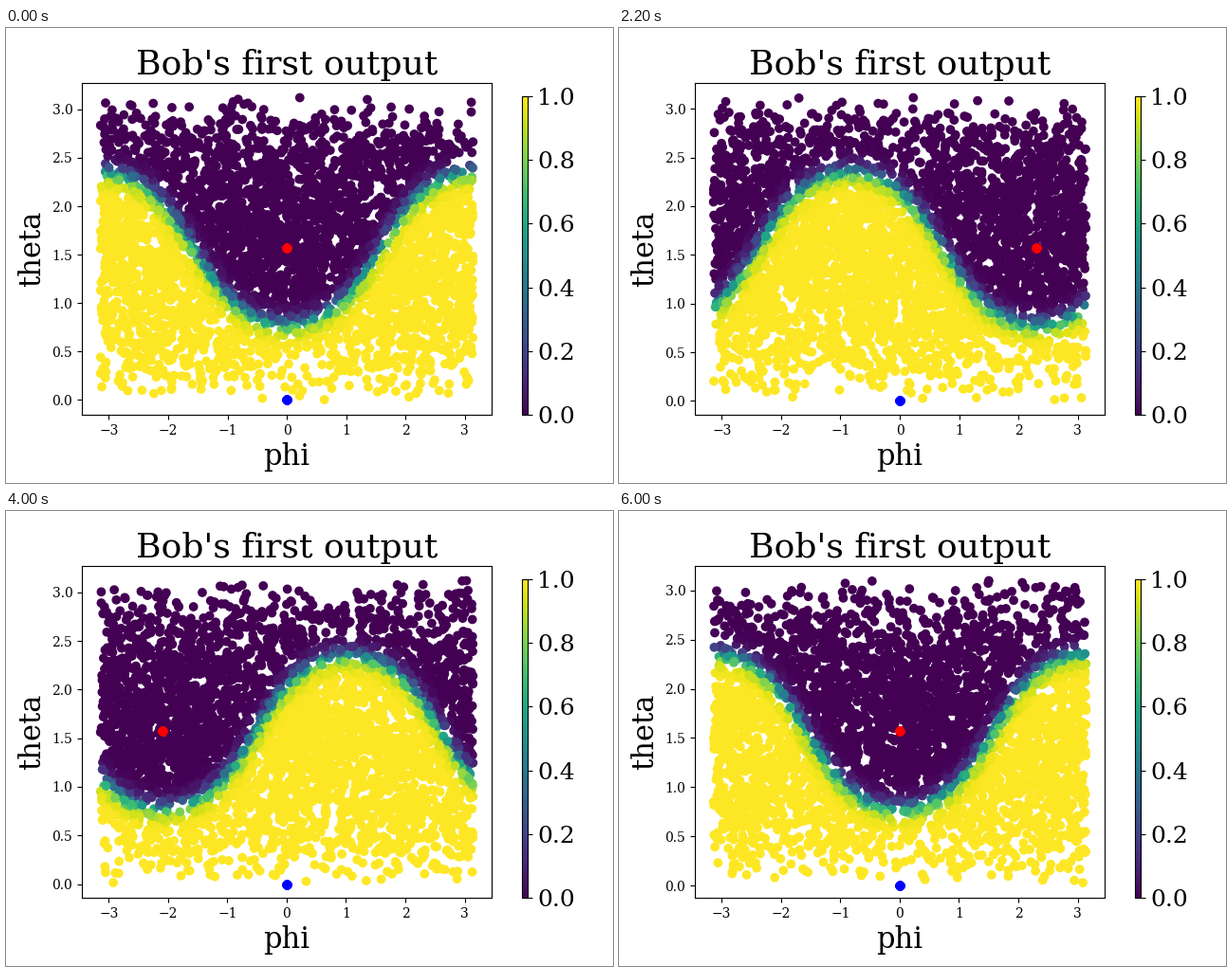
Animation, 640 px wide and 480 px high, one loop 6.2 s. Source, as a matplotlib script:

```python
import numpy as np
import matplotlib.pyplot as plt
from matplotlib.animation import FuncAnimation

FRAMES = 31
POINTS = 4000
COPIES = 60
SHARPNESS = 15

plt.rcParams["font.family"] = "DejaVu Serif"
fig = plt.figure(figsize=(6.4, 4.8), dpi=100)
ax = fig.add_axes([0.125, 0.15, 0.675, 0.73])
cax = fig.add_axes([0.85, 0.15, 0.01, 0.7])

ax.set_title("Bob's first output", fontsize=26)
ax.set_xlabel("phi", fontsize=22)
ax.set_ylabel("theta", fontsize=22)

cloud = ax.scatter(np.zeros(POINTS), np.zeros(POINTS), c=np.zeros(POINTS),
                   cmap="viridis", vmin=0, vmax=1)
bar = fig.colorbar(cloud, cax=cax)
bar.ax.tick_params(labelsize=18)


def stacked_dot(color):
    """Overlaid copies give the marker a hard edge."""
    return ax.scatter(np.zeros(COPIES), np.zeros(COPIES), color=color)


red = stacked_dot("red")
blue = stacked_dot("blue")


def sample_sphere(seed):
    rng = np.random.default_rng(seed)
    phi = rng.uniform(-np.pi, np.pi, POINTS)
    theta = np.arccos(rng.uniform(-1, 1, POINTS))
    return phi, theta


def padded(values, pad=0.05):
    margin = pad * np.ptp(values)
    return values.min() - margin, values.max() + margin


def draw(k):
    turn = 2 * np.pi * k / (FRAMES - 1)
    angle = np.arctan2(np.sin(turn), np.cos(turn))
    phi, theta = sample_sphere(k)

    # Closer to the pole -> 1, closer to the turning vector -> 0
    side = np.cos(theta) - np.sin(theta) * np.cos(phi - angle)
    cloud.set_offsets(np.column_stack([phi, theta]))
    cloud.set_array(1 / (1 + np.exp(-SHARPNESS * side)))
    red.set_offsets(np.tile([angle, np.pi / 2], (COPIES, 1)))

    ax.set_xlim(padded(phi))
    ax.set_ylim(padded(theta))
    return cloud, red, blue


anim = FuncAnimation(fig, draw, frames=FRAMES, init_func=lambda: draw(0),
                     interval=200, repeat=True, repeat_delay=0)
plt.show()
```
